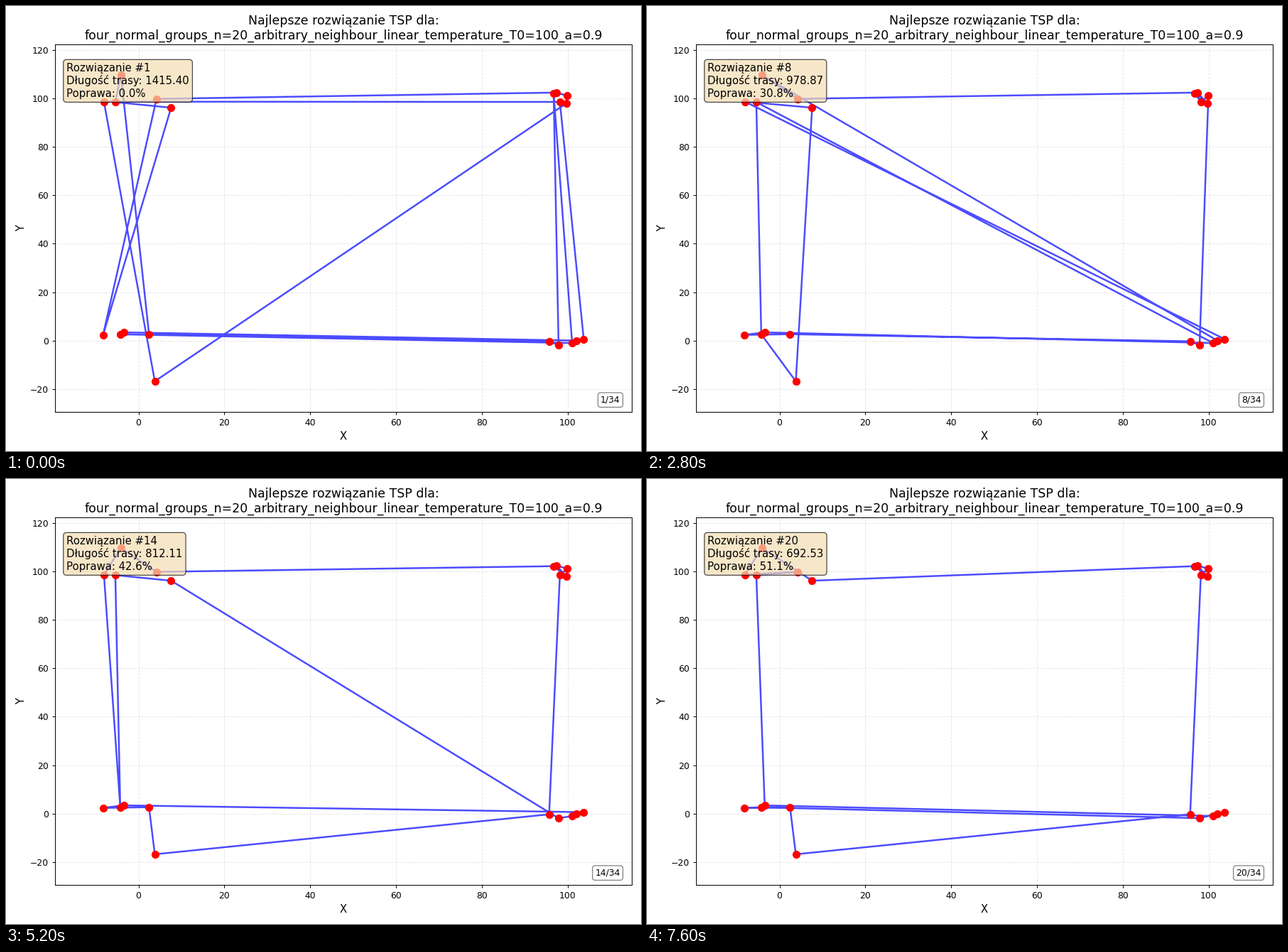
Write a matplotlib script that moves like this. It is 894x626 px and loops after 8000 ms.

```python
import matplotlib.pyplot as plt
import numpy as np
from matplotlib.animation import FuncAnimation

W, H, DPI = 894, 626, 89.4
STEPS, TOTAL = 20, 34

# Four groups of cities, named A to T: offsets from each group's centre.
GROUPS = {
    (0, 100): [(-8.05, -1.3), (-5.4, -1.5), (-4.1, 9.7), (4.2, -0.15), (7.6, -3.8)],
    (100, 100): [(-3.3, 2.2), (-2.65, 2.45), (-1.85, -1.4), (-0.35, -2), (-0.1, 1.1)],
    (0, 0): [(-8.25, 2.35), (-4.25, 2.6), (-3.45, 3.4), (2.45, 2.65), (3.8, -16.8)],
    (100, 0): [(-4.35, -0.3), (-2.15, -1.9), (1, -1), (2, 0), (3.7, 0.6)],
}
cities = np.concatenate([np.add(c, offsets) for c, offsets in GROUPS.items()])

# Milestones of the search: solution number -> (visiting order, route length).
MILESTONES = {
    1: ("NCBEKDGJIOAHTSMLRFQP", 1415.40),
    3: ("NCBEADGJIOKHTSMLRQFP", 1193.21),
    6: ("DCSTAEOLBRMKNPQJHFIG", 1136.28),
    10: ("NKMRSTPEBLACDFIGHJQO", 821.45),
    14: ("NKMTSRQEBLACDFIGJHPO", 812.11),
    18: ("NKLQRSTMBEACDFIGJHPO", 700.09),
    20: ("NKLQSTRMBDACEFIGJHPO", 692.53),
}
numbers = list(MILESTONES)
lengths = [length for _, length in MILESTONES.values()]


def tour_at(n):
    """Closed path of the milestone nearest to solution n."""
    nearest = min(numbers, key=lambda k: abs(k - n))
    order = [ord(name) - ord("A") for name in MILESTONES[nearest][0]]
    return cities[order + order[:1]]


plt.rcParams["font.family"] = "DejaVu Sans"
# The tiny surplus keeps the height from being truncated to H - 1.
fig = plt.figure(figsize=(W / DPI, (H + 1e-6) / DPI), dpi=DPI)
ax = fig.add_axes([69 / W, 1 - 571 / H, 812 / W, 517 / H])

margin = 0.1 * np.ptp(cities, axis=0)
low, high = cities.min(axis=0) - margin, cities.max(axis=0) + margin
ax.set_xlim(low[0], high[0])
ax.set_ylim(low[1], high[1])
ax.grid(True, linestyle="--", alpha=0.3)
ax.set_xlabel("X", fontsize=12)
ax.set_ylabel("Y", fontsize=12)
ax.set_title("Najlepsze rozwiązanie TSP dla:\n"
             "four_normal_groups_n=20_arbitrary_neighbour_"
             "linear_temperature_T0=100_a=0.9", fontsize=14)

route, = ax.plot([], [], "b-", linewidth=2, alpha=0.7)
ax.plot(*cities.T, "ro", markersize=8)


def label(x, y, size, color, alpha, **align):
    return ax.text(x, y, "", transform=ax.transAxes, fontsize=size, **align,
                   bbox=dict(boxstyle="round", facecolor=color, alpha=alpha))


info = label(0.02, 0.95, 12, "wheat", 0.7, va="top")
counter = label(0.98, 0.02, 10, "white", 0.5, ha="right", va="bottom")


def update(i):
    n = i + 1
    length = np.interp(n, numbers, lengths)
    gain = 100 * (1 - length / lengths[0])
    route.set_data(*tour_at(n).T)
    info.set_text(f"Rozwiązanie #{n}\n"
                  f"Długość trasy: {length:.2f}\n"
                  f"Poprawa: {gain:.1f}%")
    counter.set_text(f"{n}/{TOTAL}")
    return route, info, counter


anim = FuncAnimation(fig, update, frames=STEPS, interval=400,
                     init_func=lambda: update(0), repeat=True, repeat_delay=0)
plt.show()
```
